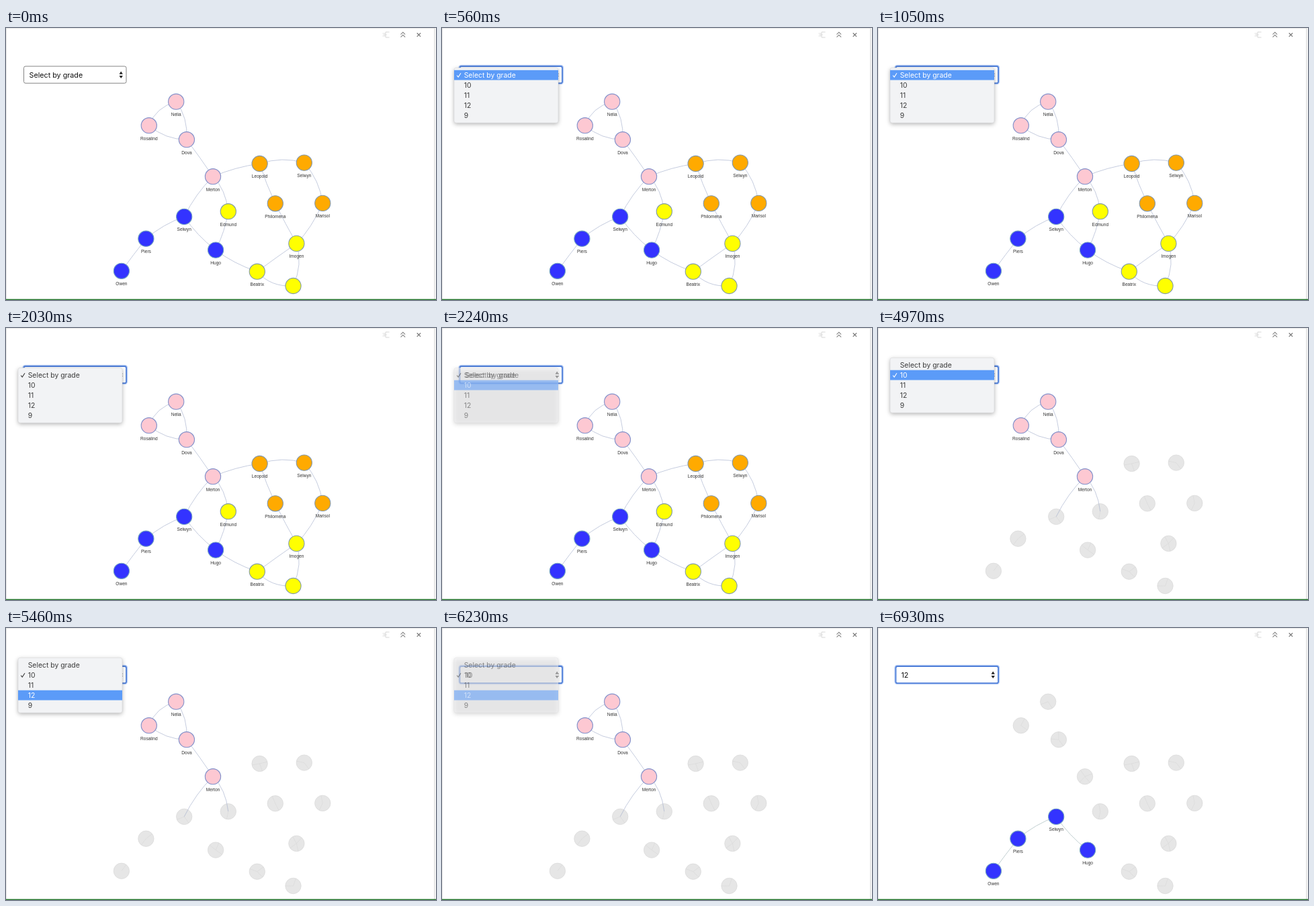
Animation, 640 px wide and 405 px high, one loop 7910 ms. Source, as an HTML page with a canvas:

```html
<!DOCTYPE html>
<html lang="en">
<head>
<meta charset="utf-8">
<title>Select by grade</title>
<style>
html, body { margin: 0; width: 100%; height: 100%; overflow: hidden; background: #fff; }
canvas { display: block; width: 640px; height: 405px; }
</style>
</head>
<body>
<canvas id="stage"></canvas>
<script>
const W = 640, H = 405, LOOP = 7910;
const canvas = document.getElementById('stage');
const ctx = canvas.getContext('2d');
const ratio = window.devicePixelRatio || 1;
canvas.width = W * ratio;
canvas.height = H * ratio;

const UI = 'Inter, "Liberation Sans", sans-serif';
const LABEL = '6.6px "Liberation Sans", Arial, sans-serif';
const OPTIONS = ['Select by grade', '10', '11', '12', '9'];
const FILL = { 9: '#ffff00', 10: '#fdc8d2', 11: '#ffaa00', 12: '#3333ff' };
const RIM = { 9: '#7f99a8', 10: '#7f8fca', 11: '#7f96ad', 12: '#6f9fc0' };

const nodes = {
  a: [253.2, 109.7, 10, 'Nelia'],
  b: [212.8, 145.2, 10, 'Rosalind'],
  c: [268.9, 166.2, 10, 'Dova'],
  d: [308, 221.2, 10, 'Merton'],
  e: [377.6, 202, 11, 'Leopold'],
  f: [443.8, 200.6, 11, 'Selwyn'],
  g: [400.8, 261.3, 11, 'Philomena'],
  h: [471.3, 260.9, 11, 'Marisol'],
  i: [330.8, 273.2, 9, 'Edmund'],
  j: [432.4, 320.9, 9, 'Imogen'],
  k: [373.8, 362.7, 9, 'Beatrix'],
  l: [427.5, 384, 9, ''],
  m: [265.2, 280.9, 12, 'Selwyn'],
  n: [208.4, 313.7, 12, 'Piers'],
  o: [312.1, 330.6, 12, 'Hugo'],
  p: [171.9, 361.8, 12, 'Owen']
};

// ends, control point, owning grade
const edges = [
  ['ab', 223, 118, 10], ['ac', 271, 133, 10], ['bc', 237, 166, 10],
  ['cd', 289, 193, 10], ['dm', 282, 247, 10], ['di', 327, 240, 10],
  ['de', 341, 207, 0], ['ef', 411, 191, 11], ['eg', 387, 232, 11],
  ['fh', 467, 227, 11], ['gj', 416, 292, 0], ['hj', 455, 298, 0],
  ['jk', 403, 341, 9], ['jl', 442, 352, 9], ['kl', 394, 386, 9],
  ['io', 326, 303, 0], ['ok', 339, 351, 0], ['mo', 284, 309, 12],
  ['mn', 234, 292, 12], ['np', 190, 337, 12]
];

function line(points, color, width) {
  ctx.beginPath();
  points.forEach(([x, y], i) => i ? ctx.lineTo(x, y) : ctx.moveTo(x, y));
  ctx.strokeStyle = color;
  ctx.lineWidth = width;
  ctx.stroke();
}

function circle(x, y, r) {
  ctx.beginPath();
  ctx.arc(x, y, r, 0, Math.PI * 2);
}

function box(x, y, w, h, r) {
  ctx.beginPath();
  ctx.roundRect(x, y, w, h, r);
}

function text(str, x, y, font, color, align = 'left') {
  ctx.font = font;
  ctx.fillStyle = color;
  ctx.textAlign = align;
  ctx.textBaseline = 'alphabetic';
  ctx.fillText(str, x, y);
}

function edge([ends, cx, cy], color, width = 0.8) {
  const p = nodes[ends[0]], q = nodes[ends[1]];
  ctx.beginPath();
  ctx.moveTo(p[0], p[1]);
  ctx.quadraticCurveTo(cx, cy, q[0], q[1]);
  ctx.strokeStyle = color;
  ctx.lineWidth = width;
  ctx.stroke();
}

function dimNode([x, y]) {
  circle(x, y, 11.7);
  ctx.fillStyle = '#e6e6e6';
  ctx.fill();
  ctx.save();
  ctx.clip();
  edges.forEach(e => edge(e, '#dadada', 0.7));
  ctx.restore();
  circle(x, y, 11.7);
  ctx.strokeStyle = '#d9d9d9';
  ctx.lineWidth = 0.7;
  ctx.stroke();
}

function liveNode([x, y, grade, name]) {
  circle(x, y, 11.6);
  ctx.fillStyle = FILL[grade];
  ctx.fill();
  ctx.strokeStyle = RIM[grade];
  ctx.lineWidth = 1.1;
  ctx.stroke();
  text(name, x, y + 21.3, LABEL, '#343434', 'center');
}

function drawGraph(grade) {
  const all = Object.values(nodes);
  const live = n => !grade || n[2] === grade;
  all.filter(n => !live(n)).forEach(dimNode);
  edges.filter(e => !grade || e[3] === grade)
    .forEach(e => edge(e, grade === 12 ? '#b3c4c6' : '#b7bfd6'));
  all.filter(live).forEach(liveNode);
}

function triangle(x, y, dy) {
  ctx.beginPath();
  ctx.moveTo(x - 2.7, y);
  ctx.lineTo(x + 2.7, y);
  ctx.lineTo(x, y + dy);
  ctx.fillStyle = '#222';
  ctx.fill();
}

function drawSelect(value, focus) {
  if (focus) {
    box(26, 56.5, 153.5, 26, 3);
    ctx.strokeStyle = '#bed2f6';
    ctx.lineWidth = 3.6;
    ctx.stroke();
  }
  box(26.5, 57, 152.5, 25.2, 2.5);
  ctx.fillStyle = '#fff';
  ctx.fill();
  ctx.strokeStyle = focus ? '#4f7fd9' : '#858585';
  ctx.lineWidth = focus ? 1.8 : 1;
  ctx.stroke();
  text(value, 34.5, 73.5, '10.75px ' + UI, '#111');
  triangle(171.2, 68.7, -4.2);
  triangle(171.2, 70.9, 4.2);
}

function drawMenu(picked, hot, alpha) {
  const top = 59.3 - picked * 15;
  ctx.save();
  ctx.globalAlpha = alpha;
  ctx.shadowColor = 'rgba(0,0,0,.3)';
  ctx.shadowBlur = 6 * ratio;
  ctx.shadowOffsetY = 2 * ratio;
  box(18, top, 155, 82, 3);
  ctx.fillStyle = '#f2f3f5';
  ctx.fill();
  ctx.shadowColor = 'transparent';
  ctx.strokeStyle = '#d2d3d5';
  ctx.lineWidth = 0.5;
  ctx.stroke();
  OPTIONS.forEach((name, i) => {
    const y = top + 10.7 + i * 15;
    const ink = i === hot ? '#fff' : '#3c3c3c';
    if (i === hot) {
      ctx.fillStyle = '#5b9bf8';
      ctx.fillRect(18, y - 7.3, 155, 14.8);
    }
    text(name, 32.7, y + 3.7, '10.4px ' + UI, ink);
    if (i === picked) line([[22.2, y + 0.6], [24.2, y + 3], [28, y - 2.8]], ink, 1.1);
  });
  ctx.restore();
}

function drawFrame() {
  ctx.fillStyle = '#fff';
  ctx.fillRect(0, 0, W, H);
  ctx.fillStyle = '#dedede';
  ctx.fillRect(0, 0, W, 0.7);
  ctx.fillRect(0, 0, 0.8, H);
  ctx.fillRect(637, 0, 1, H);
  ctx.fillStyle = '#f3f3f3';
  ctx.fillRect(638, 0, 2, H);
  ctx.fillStyle = '#23752b';
  ctx.fillRect(0, 403.6, W, 1.4);

  line([[570.5, 6], [565, 6], [565, 14], [570.5, 14]], '#d6d6d6', 1);
  line([[560.5, 8], [564, 8], [564, 12], [560.5, 12]], '#dedede', 0.9);
  line([[561, 10], [567, 10]], '#dedede', 0.8);
  for (const y of [9.7, 13.6]) line([[587.5, y], [590.8, y - 3.3], [594.1, y]], '#888', 1.1);
  line([[611.7, 7.5], [617.1, 12.9]], '#777', 1.2);
  line([[617.1, 7.5], [611.7, 12.9]], '#777', 1.2);
}

// one menu visit: open, hover steps, blink off, blink on, fade
function menuAt(t, open, picked, hovers, off) {
  const on = off + 280, gone = on + 280;
  if (t < open || t >= gone) return;
  let hot = picked;
  for (const [at, row] of hovers) if (t >= at) hot = row;
  if (t >= off && t < on) hot = -1;
  const step = Math.max(0, Math.floor((t - on) / 70));
  drawMenu(picked, hot, [1, 0.8, 0.56, 0.28][step]);
}

function draw(t) {
  const grade = t < 2450 ? 0 : t < 6440 ? 10 : 12;
  drawFrame();
  drawGraph(grade);
  drawSelect(grade ? String(grade) : OPTIONS[0], t >= 560);
  menuAt(t, 560, 0, [[1400, 1]], 1820);
  menuAt(t, 4970, 1, [[5180, 2], [5460, 3]], 5810);
}

const start = performance.now();
function tick() {
  ctx.setTransform(ratio, 0, 0, ratio, 0, 0);
  draw((performance.now() - start) % LOOP);
  requestAnimationFrame(tick);
}
tick();
</script>
</body>
</html>
```
